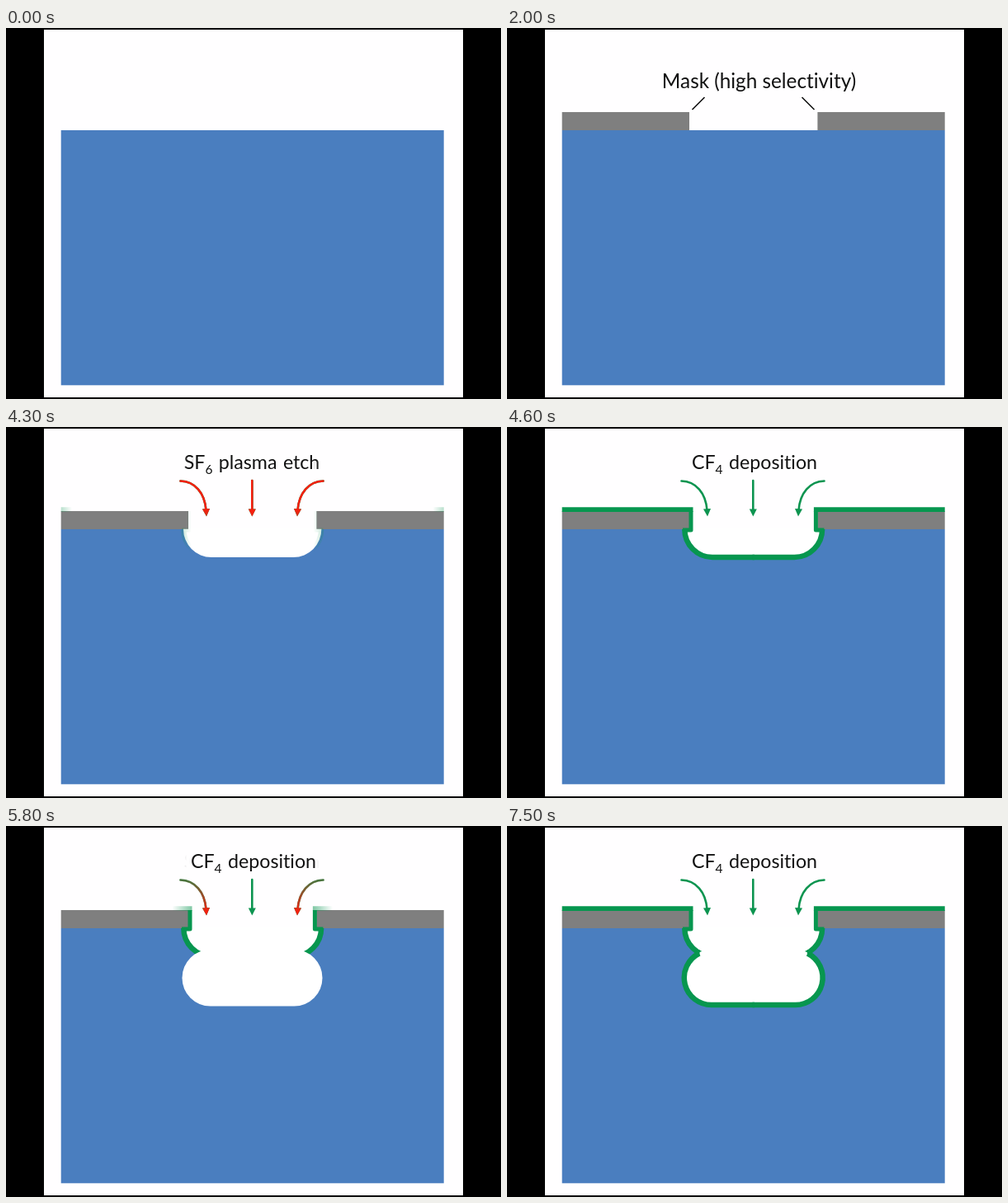
These frames come from a looping animation (600 px wide and 450 px high, 8000 ms). An HTML page:

```html
<!DOCTYPE html>
<html lang="en">
<head>
<meta charset="utf-8">
<title>Etch and deposition cycle</title>
<style>
  html, body { margin: 0; width: 100%; height: 100%; overflow: hidden; background: #000; }
  svg { display: block; width: 100vw; height: 100vh; }
  text {
    font: 24.3px Lato, "Open Sans", sans-serif; text-anchor: middle; fill: #111;
    font-variant-ligatures: none;
  }
  .recipe { font-size: 23.2px; word-spacing: 1.5px; }
  .sub { font-size: 15.5px; }
  .film { fill: none; stroke: #07964f; stroke-width: 6.5; }
  .thin { stroke-width: 5; }
  .shaft { fill: none; stroke-width: 2.6; stroke-linecap: round; }
  .red { stroke: #f5200f; fill: #f5200f; }
  .green { stroke: #0d9450; fill: #0d9450; }
</style>
</head>
<body>
<svg viewBox="0 0 600 450" xmlns="http://www.w3.org/2000/svg">
  <defs id="defs">
    <g id="side">
      <path class="shaft" d="M211.5 65.5C229 66 241 80 242.5 101"/>
      <path stroke="none" d="M238 99.5L247 99L243 108.5Z"/>
    </g>
    <g id="sides">
      <use href="#side"/>
      <use href="#side" transform="translate(596) scale(-1 1)"/>
    </g>
    <g id="middle">
      <path class="shaft" d="M298.3 65V101"/>
      <path stroke="none" d="M293.8 99.5H302.8L298.3 108.5Z"/>
    </g>
  </defs>
  <rect x="46" y="2" width="508" height="446" fill="#fffeff"/>
  <rect x="66.7" y="124" width="464" height="309.3" fill="#4a7ebf"/>

  <!-- Layers marked data-mirror hold a left half; the script reflects it. -->
  <g id="resist" data-mirror fill="#7f7f7f"><path d="M66.7 102H221V124H66.7Z"/></g>
  <g id="cavity" data-mirror fill="#fff"><path d="M215 123.8A34 34 0 0 0 249 158H300V123.8Z"/></g>
  <g id="wall" data-mirror class="film">
    <path d="M215.3 124A33.7 34 0 0 0 249 158H300"/>
    <path class="thin" stroke-linejoin="round" d="M223 102V125H213"/>
  </g>
  <rect id="bulb" x="213.5" y="150" width="170" height="68.5" rx="34.2" fill="#fff"/>
  <g id="lining" data-mirror class="film">
    <path d="M233 154.5A33 33 0 0 0 248.5 217H300"/>
    <path class="thin" d="M231 150V158"/>
  </g>
  <g id="cap" data-mirror fill="#07964f"><path d="M66.7 97.3H225.5V103H66.7Z"/></g>

  <g id="label">
    <text x="305.5" y="73">Mask (high selectivity)</text>
    <path d="M239.5 84L224.5 99M357.5 84L372.5 99" stroke="#111" stroke-width="1.6"/>
  </g>
  <text id="etchText" class="recipe" x="298" y="51">SF<tspan class="sub" dy="6">6</tspan><tspan dy="-6"> plasma etch</tspan></text>
  <text id="filmText" class="recipe" x="300" y="51">CF<tspan class="sub" dy="6">4</tspan><tspan dy="-6"> deposition</tspan></text>
  <g id="greenArrows" class="green"><use href="#sides"/><use href="#middle"/></g>
  <g id="redSides" class="red"><use href="#sides"/></g>
  <g id="redMiddle" class="red"><use href="#middle"/></g>
</svg>
<script>
const LOOP = 8000, STEP = 100, PERIOD = 2610;
const SLOW = 315, FAST = 180, CUT = 1;
const $ = id => document.getElementById(id);
const clamp = v => Math.max(0, Math.min(1, v));

// Start of a process in round n; later rounds delay the captions by a share of the lag.
const process = (first, lag) => (n, share = 0) => first + n * (PERIOD + share * lag);
const etch = process(2985, 195);
const deposit = process(4285, 285);

// The caption changes, in order of time.
const swaps = share => [0, 1].flatMap(n => [etch(n, share), deposit(n, share)]);

function make(tag, attrs, parent) {
  const el = document.createElementNS("http://www.w3.org/2000/svg", tag);
  for (const k in attrs) el.setAttribute(k, attrs[k]);
  return parent.appendChild(el);
}

document.querySelectorAll("[data-mirror]").forEach(layer => {
  const half = layer.innerHTML;
  make("g", { transform: "translate(597.4) scale(-1 1)" }, layer).innerHTML = half;
});

// Times alternate between entering and leaving. The wipe runs from both outer
// edges to the middle, or from the bottom up.
function wipe(id, times, length, soft = .3, upward = false) {
  const el = $(id), box = el.getBBox();
  const axis = upward
    ? { x1: 0, x2: 0, y1: box.y + box.height, y2: box.y }
    : { x1: box.x, x2: box.x + box.width / 2, y1: 0, y2: 0 };
  const grad = make("linearGradient", {
    id: id + "Grad", gradientUnits: "userSpaceOnUse", spreadMethod: upward ? "pad" : "reflect", ...axis
  }, $("defs"));
  const stops = [make("stop", {}, grad), make("stop", {}, grad)];
  const mask = make("mask", {
    id: id + "Mask", maskUnits: "userSpaceOnUse", x: 0, y: 0, width: 600, height: 450
  }, $("defs"));
  make("rect", { width: 600, height: 450, fill: `url(#${id}Grad)` }, mask);

  return t => {
    const begun = times.filter(start => t > start).length;
    const entering = begun % 2 === 1;
    const done = begun ? clamp((t - times[begun - 1]) / length) : 1;
    el.setAttribute("visibility", !entering && done === 1 ? "hidden" : "visible");
    el.setAttribute("mask", done === 1 ? "none" : `url(#${id}Mask)`);
    const front = done * (1 + soft);
    [front - soft, front].forEach((edge, i) => {
      const at = clamp(edge), cover = clamp((front - at) / soft);
      const grey = Math.round(255 * (entering ? cover : 1 - cover));
      stops[i].setAttribute("offset", at);
      stops[i].setAttribute("stop-color", `rgb(${grey},${grey},${grey})`);
    });
  };
}

const MASK = 1560;
const parts = [
  wipe("resist", [MASK], 440),
  wipe("label", [MASK, etch(0)], SLOW),
  wipe("cavity", [etch(0)], FAST),
  wipe("wall", [deposit(0)], FAST, .65),
  wipe("bulb", [etch(1)], FAST),
  wipe("lining", [deposit(1)], FAST, .65),
  wipe("cap", [deposit(0), etch(1), deposit(1)], SLOW, .2),
  wipe("etchText", swaps(1), SLOW),
  wipe("filmText", swaps(1).slice(1), SLOW),
  wipe("greenArrows", [deposit(0, 1), etch(1, 1) + SLOW, deposit(1, 1)], CUT),
  wipe("redSides", swaps(.5), FAST, 1.2, true),
  wipe("redMiddle", swaps(1), FAST)
];

let origin = null;
function tick(now) {
  origin ??= now;
  const t = (now - origin) % LOOP;
  parts.forEach(draw => draw(Math.floor(t / STEP) * STEP));
  requestAnimationFrame(tick);
}
tick(performance.now());
</script>
</body>
</html>
```
